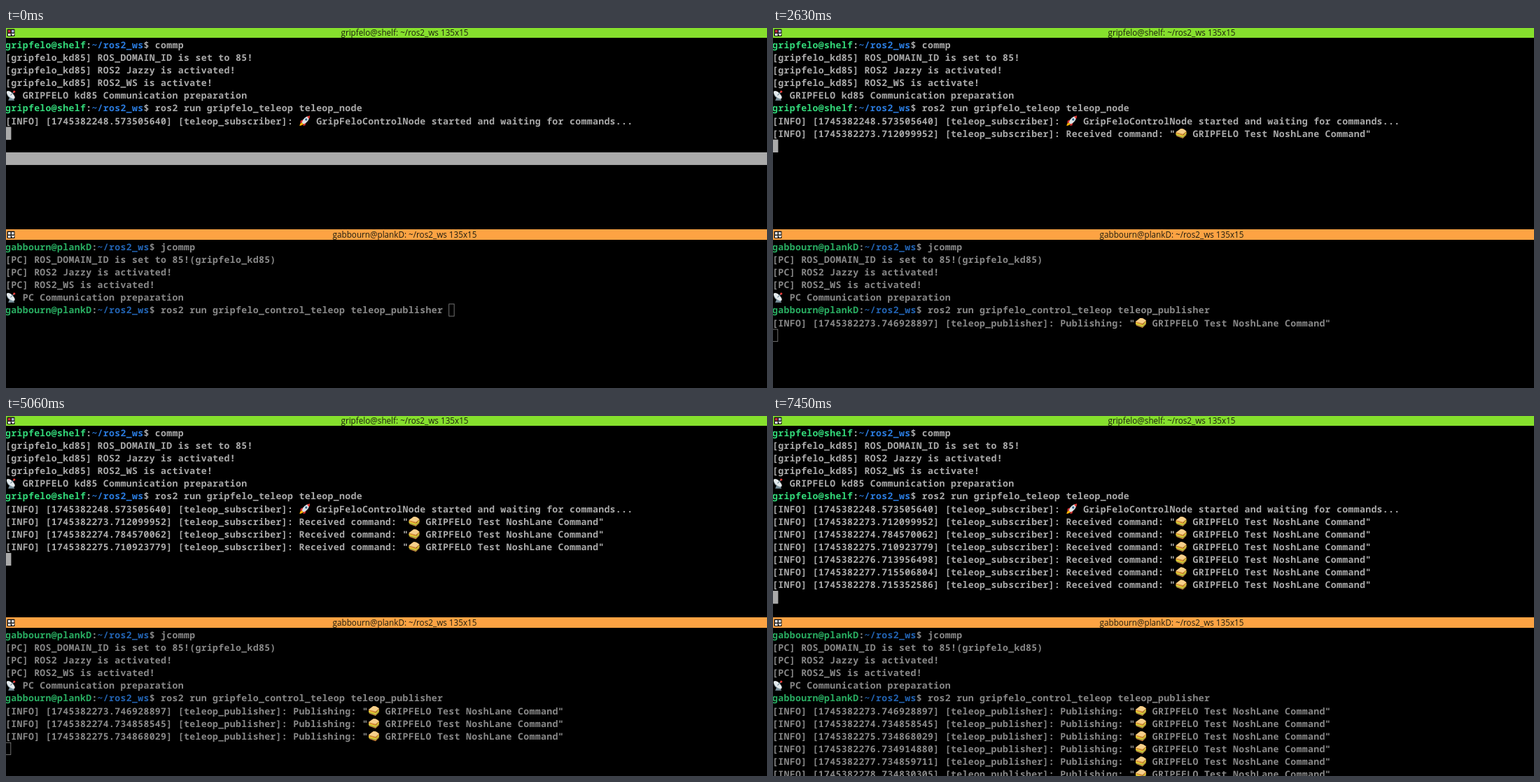
Animation, 1087 px wide and 515 px high, one loop 8020 ms. Source, as an HTML page:

```html
<!DOCTYPE html>
<html lang="en">
<head>
<meta charset="utf-8">
<title>Two terminals</title>
<style>
  html, body { margin: 0; width: 100%; height: 100%; overflow: hidden; background: #000; }
  main { position: relative; width: 100%; height: 100%; overflow: hidden; contain: strict; }
  .pane { position: absolute; left: 0; width: 100%; height: 289px; overflow: hidden;
    --fg: #888; --user: #29ae62; --path: #2263b2; --bar: #fda343; }
  .pane.on { --fg: #aaa; --user: #33da7a; --path: #2a7bde; --bar: #86e02d; }
  .bar { height: 15px; background: var(--bar); color: #1c1c10; font: 11.7px/15px "Open Sans", "Noto Sans", sans-serif;
    text-align: center; text-indent: 52px; white-space: pre; }
  .bar svg { position: absolute; left: 1px; top: 2px; }
  .on .hot { fill: #c8283c; }
  .on .cool { fill: #a9b4e0; }
  /* 10 x 22 character cells, shown at a reduced scale */
  .rows { position: absolute; top: 16px; left: -1px; transform: scale(.8225); transform-origin: 0 0;
    color: var(--fg); font: bold 16px/22px "Noto Sans Mono", "DejaVu Sans Mono", monospace;
    letter-spacing: calc(10px - 1ch); text-rendering: geometricPrecision; font-variant-ligatures: none; }
  .rows div { height: 22px; white-space: pre; }
  .rows svg { width: 20px; height: 22px; vertical-align: top; }
  .rows b { color: var(--user); }
  .rows i { color: var(--path); font-style: normal; }
  .rows .cursor { position: absolute; box-sizing: border-box; width: 10px; height: 22px; border: 1.2px solid var(--fg); }
  .on .cursor { background: var(--fg); }
  .rows .strip { position: absolute; top: 198px; left: 0; width: 1350px; background: var(--fg); }
</style>
</head>
<body>
<main></main>
<svg width="0" height="0" style="position:absolute;top:0">
  <symbol id="dish" viewBox="0 0 20 22">
    <path d="M5 20 L8 13 H13 L16 20Z" fill="#78909c"/>
    <path d="M3 4 C1 11 7 18 16 16Z" fill="#90a4ae"/>
    <ellipse cx="9.5" cy="10" rx="9" ry="4" transform="rotate(43 9.5 10)" fill="#e4eaed"/>
    <path d="M9 11 L15 5" stroke="#78909c" stroke-width="1.5"/>
    <circle cx="15.5" cy="4.5" r="2" fill="#e53935"/>
  </symbol>
  <symbol id="rocket" viewBox="0 0 20 22">
    <path d="M1 20 Q2 14 6 14 L8 16 Q7 19 1 20Z" fill="#ffb300"/>
    <path d="M8 9 L3 11 L2 15 L7 14Z M12 14 L11 19 L7 20 L8 15Z" fill="#d32f2f"/>
    <path d="M5 14 Q8 4 18 3 Q18 13 8 17Z" fill="#dce3e6"/>
    <path d="M14 4 Q16 3 19 2 Q19 5 17.5 8Z" fill="#e53935"/>
    <circle cx="12.5" cy="9" r="2" fill="#33648a"/>
  </symbol>
  <symbol id="bread" viewBox="0 0 20 22">
    <path d="M1 10 L14 14 L19 8 V14 L13 20 L2 16Z" fill="#c07a32"/>
    <path d="M1 11 L13 15.5 L19 9 V12 L13 18 L1 14Z" fill="#8bc34a"/>
    <path d="M1 11 L13 15 L19 9.5 V11 L13 16.5 L1 13Z" fill="#ffca28"/>
    <path d="M1 9 L9 3 Q13 2 19 7 V9 L13 14 L1 11Z" fill="#d9953f"/>
    <path d="M1 9 L9 3 Q13 2 19 7 L13 12Z" fill="#f6d08b"/>
  </symbol>
</svg>
<script>
const LOOP = 8020;
const FOCUS_BOTTOM = 30, ENTER = 780, FOCUS_TOP = 2630;
const BLINKS = [640, 780, 1380, 1990, 3240, 3840, 4450, 5060, 5630, 6240, 6840, 7450];
const SENT = [2390, 3390, 4380, 5390, 6400, 7380];
const RECEIVED = [2430, 3470, 4420, 5430, 6440, 7420];

const icon = id => `<svg><use href="#${id}"/></svg>`;
const prompt = (user, cmd) => `<b>${user}</b>:<i>~/ros2_ws</i>$ ${cmd}`;
const info = (stamp, node, text) => `[INFO] [17453822${stamp}] [${node}]: ${text}`;
const order = `"${icon("bread")} GRIPFELO Test NoshLane Command"`;

const received = ["73.712099952", "74.784570062", "75.710923779", "76.713956498", "77.715506804", "78.715352586"]
  .map(s => info(s, "teleop_subscriber", "Received command: " + order));
const sent = ["73.746928897", "74.734858545", "75.734868029", "76.734914880", "77.734859711", "78.734830305"]
  .map(s => info(s, "teleop_publisher", "Publishing: " + order));

function makePane(top, user, base, log) {
  const el = document.createElement("section");
  el.className = "pane";
  el.style.top = top + "px";
  el.innerHTML = `<div class="bar"><svg width="13" height="12">
      <rect x=".5" y=".5" width="11" height="10.5" rx="1" fill="#1c1c1c"/>
      <path class="hot" d="M2 2h3.5v3.5h-3.5z" fill="#eee"/>
      <path class="cool" d="M7 2h3.5v3.5h-3.5z" fill="#ddd"/>
      <path d="M2 7h3.5v3h-3.5z M6.5 7h5l-2.5 3.5z" fill="#fff"/></svg>${user}: ~/ros2_ws 135x15</div>
    <div class="rows">${[...base, ...log].map(s => `<div>${s}</div>`).join("")}<div class="cursor"></div></div>`;
  document.querySelector("main").append(el);
  const cursor = el.querySelector(".cursor");
  const lines = [...el.querySelectorAll(".rows > div:not(.cursor)")].slice(base.length);
  return {
    el,
    draw(focused, count, row, col, lit) {
      el.classList.toggle("on", focused);
      lines.forEach((line, i) => line.hidden = i >= count);
      cursor.style.left = col * 10 + "px";
      cursor.style.top = row * 22 + "px";
      cursor.hidden = focused && !lit;
    }
  };
}

const robot = "gripfelo@shelf", desk = "gabbourn@plankD";
const upper = makePane(-1, robot, [
  prompt(robot, "commp"),
  "[gripfelo_kd85] ROS_DOMAIN_ID is set to 85!",
  "[gripfelo_kd85] ROS2 Jazzy is activated!",
  "[gripfelo_kd85] ROS2_WS is activate!",
  icon("dish") + " GRIPFELO kd85 Communication preparation",
  prompt(robot, "ros2 run gripfelo_teleop teleop_node"),
  info("48.573505640", "teleop_subscriber", icon("rocket") + " GripFeloControlNode started and waiting for commands...")
], received);
const lower = makePane(288, desk, [
  prompt(desk, "jcommp"),
  "[PC] ROS_DOMAIN_ID is set to 85!(gripfelo_kd85)",
  "[PC] ROS2 Jazzy is activated!",
  "[PC] ROS2_WS is activated!",
  icon("dish") + " PC Communication preparation",
  prompt(desk, "ros2 run gripfelo_control_teleop teleop_publisher")
], sent);

const strip = document.createElement("div");
strip.className = "strip";
upper.el.querySelector(".rows").append(strip);

const passed = (times, t) => times.filter(x => x <= t).length;

function frame(now) {
  const t = now % LOOP;
  const lowerFocus = t >= FOCUS_BOTTOM && t < FOCUS_TOP;
  const lit = passed(BLINKS, t) % 2 === 0;
  const got = passed(RECEIVED, t), out = passed(SENT, t);
  upper.draw(!lowerFocus, got, 7 + got, 0, lit);
  if (t < ENTER) lower.draw(lowerFocus, 0, 5, 77, lit);
  else lower.draw(lowerFocus, out, 6 + out, 0, lit);
  strip.hidden = got > 0;
  requestAnimationFrame(frame);
}
frame(0);
</script>
</body>
</html>
```
